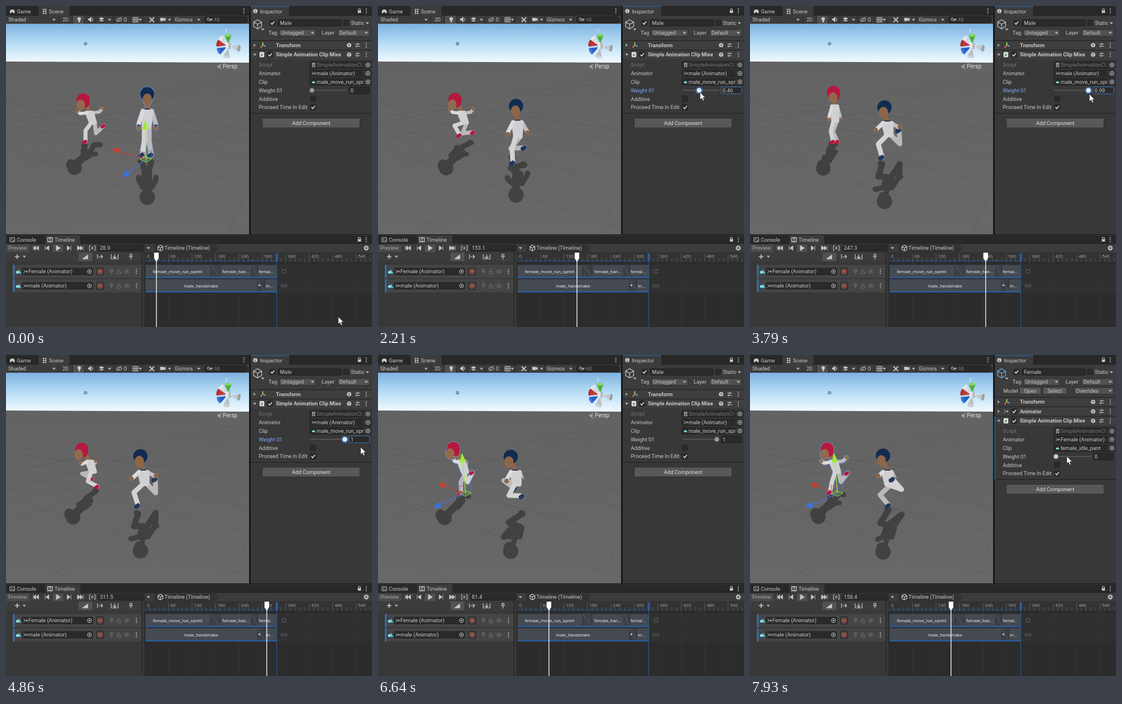
Animation of 640x561 px, one loop 8 s. Source, as an HTML page:

```html
<!DOCTYPE html>
<html lang="en">
<head>
<meta charset="utf-8">
<title>Animation clip mixer</title>
<style>
html, body { margin: 0; width: 100%; height: 100%; overflow: hidden; background: #282828; }
svg { display: block; width: 100vw; height: 100vh; }
text { font: 9.3px Roboto, sans-serif; white-space: pre; }
</style>
</head>
<body>
<svg id="stage" viewBox="0 0 640 561" preserveAspectRatio="none"></svg>
<script>
const LOOP = 8000, STEP = 1000 / 14, TAU = 2 * Math.PI;
const INK = '#c8c8c8', PANEL = '#3c3c3c', DARK = '#191919', FIELD = '#2a2a2a', BLUE = '#3a79bb';

// --- drawing helpers -------------------------------------------------
const rect = (x, y, w, h, fill, more = '') =>
  `<rect x="${x}" y="${y}" width="${w}" height="${h}" fill="${fill}" ${more}/>`;
const text = (x, y, s, { fill = INK, size = 9.3, bold, mid, more = '' } = {}) =>
  `<text x="${x}" y="${y + 3.4}" fill="${fill}" style="font-size:${size}px;font-weight:${bold ? 700 : 400}" ${mid ? 'text-anchor="middle"' : ''} ${more}>${s}</text>`;
const path = (d, stroke = INK, fill = 'none', width = 1, more = '') =>
  `<path d="${d}" stroke="${stroke}" fill="${fill}" stroke-width="${width}" ${more}/>`;
const dot = (x, y, r, fill = INK, more = '') => `<circle cx="${x}" cy="${y}" r="${r}" fill="${fill}" ${more}/>`;
const ring = (x, y, r, more = '') => dot(x, y, r, 'none', `stroke="${INK}" ${more}`);
const group = (s, more = '') => `<g ${more}>${s}</g>`;
const arrow = (x, y) => path(`M${x - 3} ${y - 1.5}h6l-3 3.5z`, 'none', '#b8b8b8');
const dots = (x, y) => [-3.5, 0, 3.5].map(d => dot(x, y + d, 0.9)).join('');
const lock = (x, y) => rect(x - 2.8, y - 0.5, 5.6, 4.2, INK) + path(`M${x - 1.8} ${y}v-2a1.8 1.8 0 0 1 3.6 0v2`, INK, 'none', 1.1);
const box = (x, y, w, h, fill = FIELD) => rect(x, y, w, h, fill, 'rx="2" stroke="#212121" stroke-width=".7"');
const check = (x, y, on) => box(x - 5, y - 5, 10, 10) + (on ? path(`M${x - 3} ${y}l2.2 2.5 4-5`, '#e0e0e0', 'none', 1.5) : '');
const target = (x, y) => ring(x, y, 3.5) + dot(x, y, 1.3);
const cube = (x, y, r, color) => path(`M${x} ${y - r}l${r * .87} ${r / 2}v${r}l${-r * .87} ${r / 2}l${-r * .87} ${-r / 2}v${-r}zM${x - r * .87} ${y - r / 2}l${r * .87} ${r / 2}l${r * .87} ${-r / 2}M${x} ${y}v${r}`, color, 'none', 1.2);
const fork = (x, y) => path(`M${x - 3.5} ${y - 3}l3 3h4M${x - 3.5} ${y + 3}l3 -3M${x + 1.5} ${y - 2}l2 2l-2 2`);
const clipMark = (x, y, s = 1) => path(`M${x - 3 * s} ${y + 3 * s}l${3.5 * s} ${-6 * s}l${3.5 * s} ${6 * s}z`, 'none', '#59d0d6') + dot(x - 2 * s, y + s, 1.8 * s, '#a6e8ea');
const button = (x, y, w, s) => box(x, y - 6, w, 12, '#585858') + text(x + w / 2, y, s, { mid: true });
const dropdown = (x, y, w, s) => box(x, y - 6, w, 12, '#515151') + text(x + 3, y, s) + arrow(x + w - 6, y);

// --- maths helpers ---------------------------------------------------
const mix = (a, b, k) => a.map((n, i) => n + (b[i] - n) * k);
const add = ([x, y], [dx, dy]) => [x + dx, y + dy];
const clamp = n => Math.min(1, Math.max(0, n));
const ease = k => k * k * (3 - 2 * k);

// --- scene view ------------------------------------------------------
function sceneBack() {
  let grid = '';
  for (let i = -3; i < 5; i++) grid += `M-450 98L${459 + i * 330} 399M520 98L${58 + i * 330} 399`;
  return '<clipPath id="view"><rect y="31" width="425" height="368"/></clipPath>' +
    rect(0, 31, 425, 368, 'url(#sky)') + path('M0 97L425 99V399H0z', 'none', 'url(#ground)') +
    path(grid, '#505050', 'none', 1, 'opacity=".4" clip-path="url(#view)"') +
    dot(139, 66, 2.6, '#8fa6bd', 'stroke="#5d7896"');
}

function sceneFront() {
  const cone = (angle, color, cap) => group(path('M4 0L19-6V6z', 'none', color) +
    `<ellipse cx="19" rx="2.500" ry="6" fill="${cap}"/>`, `transform="translate(389 70) rotate(${angle})"`);
  return text(383, 42, 'y', { fill: '#d8e8f0', size: 9 }) +
    cone(100, '#b9bec2', '#cfd3d6') + cone(225, '#d9dcde', '#e6e8ea') + cone(12, '#c4c8cb', '#9ba0a4') +
    cone(-92, '#4fae36', '#87d667') + cone(195, '#c23a3a', '#b02f2f') + cone(152, '#2a5fc0', '#3d78da') +
    rect(384, 64, 9, 11, '#e4e6e8') + rect(389, 64, 4, 11, '#b5b9bd') +
    path('M376 102l-6 4 6 4M376 106h-5', '#d6d6d6') + text(379, 106, 'Persp', { fill: '#e2e2e2', size: 10 });
}

function sceneBars() {
  return rect(0, 0, 426, 17, '#282828') + rect(57, 0, 54, 17, PANEL) + rect(0, 17, 425, 14, PANEL) +
    path('M7 8q-1 5 1 5l2-2h2l2 2q2 0 1-5-1-2-4-2t-4 2z', 'none', INK) + text(19, 9.5, 'Game') +
    path('M64 6h7M64 9.5h7M64 13h7M65.5 5v9M69.5 5v9') + text(75, 9.5, 'Scene') + dots(416, 8.5) +
    path('M92 17v14m24 0v-14m20 0v14m21 0v-14m31 0v14m29 0v-14m22 0v14m25 0v-14m27 0v14m52 0v-14', '#262626') +
    text(4, 23.5, 'Shaded') + text(99, 23.5, '2D', { size: 8.5 }) +
    rect(117, 17, 19, 14, '#505050') + dot(128, 22.5, 3) + rect(126.7, 25, 2.6, 3.5, INK) +
    path('M144 22h2l3-3v9l-3-3h-2zM151 21q2 2.5 0 5', INK, INK, .7) +
    path('M163 22l4-2 4 2-4 2zM163 25l4 2 4-2', INK, INK, .8) +
    path('M193 24q5-6 10 0-5 5-10 0zM194 28l8-9') + text(206, 23.5, '0') +
    path('M222 20h9v8h-9zM225 20v8M228 20v8M222 24h9') + path('M251 20l8 8M259 20l-8 8', INK, 'none', 1.8) +
    path('M270 21h6v5h-6zM276 23l3-2v5l-3-2z', INK, INK, .7) + text(295, 23.5, 'Gizmos') +
    rect(347, 18.5, 75, 11, '#292929', 'rx="4" stroke="#1c1c1c" stroke-width=".7"') +
    ring(354, 23, 2.2) + path('M356 25l2 2') + text(364, 23.5, 'All', { fill: '#808080', size: 8.5 }) +
    [84, 181, 235, 286, 337, 359].map(x => arrow(x, 24)).join('');
}

// --- inspector -------------------------------------------------------
function component(y, name, icon, on) {
  const open = name.startsWith('Simple');
  return rect(428, y - 8, 212, 16, '#3e3e3e') + rect(428, y - 8.5, 212, 1, '#1f1f1f') +
    (open ? arrow(435, y) : path(`M433 ${y - 3}l4 3-4 3z`, 'none', '#9a9a9a')) + icon +
    (on ? check(462, y, true) : '') + text(472, y, name, { bold: true, size: 9.2 }) +
    dot(600, y, 3.8) + text(600, y, '?', { fill: PANEL, size: 7, mid: true, bold: true }) +
    path(`M611 ${y - 2}h8M615 ${y - 4}v4M611 ${y + 2}h8M613 ${y}v4`) + dots(630, y);
}

function inspector(who, animator, clip, shift) {
  const female = shift > 0, own = id => female ? '' : `id="${id}"`;
  const row = i => 103 + shift + i * 14.8;
  const ref = (i, s, icon, fill) => box(531, row(i) - 6, 107, 12) + icon(538, row(i), .8) + text(543, row(i), s, { fill }) +
    rect(625, row(i) - 5, 12, 10, '#353535') + target(633, row(i));
  const axes = (x, y) => path(`M${x} ${y}v-5`, '#8fd04a', 'none', 2) + path(`M${x} ${y}l-4 4`, '#e66a4c', 'none', 2) + path(`M${x} ${y}l5 2`, '#4fa5e8', 'none', 2);
  const script = (x, y) => rect(x - 3, y - 4, 6, 8, '#8a8a8a') + text(x, y, '#', { size: 6, mid: true, fill: '#333' });
  const transformY = female ? 82 : 68.5, mixerY = 85 + shift, sliderY = row(3);

  let s = rect(428, 17, 212, female ? 57 : 44, PANEL) + cube(440, 32, 8, female ? '#63b5e8' : INK) + arrow(449, 41) +
    check(466, 29.5, true) + box(475, 23.5, 112, 12) + text(479, 29.5, who) + check(595, 29.5) + text(603, 29.5, 'Static') + arrow(632, 30) +
    text(459, 47, 'Tag') + dropdown(478, 47, 64, 'Untagged') + text(552, 47, 'Layer') + dropdown(580, 47, 56, 'Default');
  if (female) s += text(443, 62.5, 'Model') + button(471, 62.5, 38, 'Open') + button(512, 62.5, 42, 'Select') +
    dropdown(567, 62.5, 69, 'Overrides') + component(98.5, 'Animator', fork(448, 98.5), true);
  s += component(transformY, 'Transform', axes(449, transformY)) +
    component(mixerY, 'Simple Animation Clip Mixe', box(443, mixerY - 5, 9, 10, '#e8e8e8') +
      text(447.5, mixerY, '#', { fill: '#2d7a3e', size: 8, mid: true, bold: true }), true);
  s += ['Script', 'Animator', 'Clip', 'Weight 01', 'Additive', 'Proceed Time In Edit']
    .map((label, i) => text(442, row(i), label, { fill: i ? INK : '#777', more: i === 3 ? own('weightLabel') : '' })).join('');
  s += ref(0, 'SimpleAnimationCl', script, '#777') + ref(1, animator, fork) + ref(2, clip, clipMark) +
    rect(532, sliderY - .7, 64, 1.4, '#5e5e5e') +
    (female ? '' : dot(535, sliderY, 6.5, BLUE, 'id="halo" opacity=".75"')) +
    dot(535, sliderY, 3.9, female ? '#d0d0d0' : '#999', own('knob')) +
    rect(600, sliderY - 6, 36, 12, FIELD, `rx="2" stroke="#212121" ${own('weightBox')}`) +
    text(602.5, sliderY, '0', { more: own('weightText') }) +
    check(537, row(4)) + check(537, row(5), true) + rect(428, row(5) + 10, 212, 1, '#1f1f1f') +
    box(448, 196 + shift, 171, 17, '#585858') + text(533.5, 204.5 + shift, 'Add Component', { mid: true, fill: '#e0e0e0' });
  return s + (female ? rect(427.5, 107, 1.5, 111, '#1d6ba3') : '');
}

function inspectorPanel() {
  return rect(428, 0, 212, 399, '#383838') + rect(428, 0, 212, 17, '#282828') + rect(428, 0, 67, 17, PANEL) + rect(428, 0, 67, 1.5, '#2c5d87') +
    dot(436, 9, 3.8) + text(436, 9, 'i', { fill: PANEL, size: 7, mid: true, bold: true }) + text(444, 9.5, 'Inspector') +
    lock(618, 8.5) + dots(630, 8.5) +
    group(inspector('Male', 'male (Animator)', 'male_move_run_spri', 0), 'id="malePanel"') +
    group(inspector('Female', 'Female (Animator)', 'female_idle_pant', 30), 'id="femalePanel"');
}

// --- timeline --------------------------------------------------------
const timeX = v => 243.3 + 0.683 * v;

function track(y, name) {
  return rect(12, y - 11.5, 225, 23, '#454545') + rect(12, y - 11.5, 3, 23, '#2f6fb0') + clipMark(22, y, 1.2) +
    box(28, y - 6, 124, 12) + fork(34, y) + text(39, y, name) + target(146, y) +
    box(158, y - 6.5, 13, 13, '#3a3a3a') + dot(164.5, y, 4, 'none', 'stroke="#c9634f" stroke-width="1.2"') + dot(164.5, y, 2, '#d0664f') +
    path(`M182 ${y - 4}h5M183 ${y - 4}v4M186 ${y - 4}v4M181 ${y}h7M184.5 ${y}v4M194.5 ${y}h6v4h-6zM196 ${y}v-2a2 2 0 0 1 3 -1M206 ${y}q5.5-6 11 0-5.5 6-11 0z`, '#707070') +
    dot(211.5, y, 1.6, '#707070') + dots(228, y);
}

function clips(y, blends, names) {
  const top = y - 11.5, base = y + 9.3;
  const blend = ([a, b]) => rect(a, top, b - a, 20.8, '#3c4147') +
    path(`M${a} ${top}V${base}M${b} ${top}V${base}`, '#2b2f33') + path(`M${a} ${top}L${b} ${base}`, '#5a6066');
  return rect(244, top, 229, 21, '#444a50') + blends.map(blend).join('') + rect(244, base, 229, 2.2, '#2c62a8') +
    names.map(([x, n]) => text(x, y, n, { size: 8, mid: true, fill: '#e4e4e4' })).join('');
}

function timeline() {
  let s = rect(0, 400, 640, 161, '#383838') + rect(0, 401, 640, 15, '#282828') + rect(69, 401, 61, 15, PANEL) + rect(0, 416, 640, 15, PANEL) +
    path('M7 405h8v7h-8zM9 407l2 1.5-2 1.5M12 410h2') + text(19, 408.5, 'Console') +
    path('M73 405h8v7h-8zM77 405v7', INK, 'none', 1.3) + text(85, 408.5, 'Timeline') + lock(618, 408) + dots(630, 408.5) +
    rect(0, 417, 41, 13, '#4a4a4a') + text(4, 423, 'Preview', { fill: '#a8a8a8' }) + rect(82, 417, 18, 13, '#505050') +
    path('M48 419v8M52 419l-4 4 4 4zM57 419l-4 4 4 4zM68.5 419v8M75 419l-5 4 5 4zM88 418.5l7 4.5-7 4.5zM107 419l5 4-5 4zM113.5 419v8M125 419l5 4-5 4zM130 419l4 4-4 4zM135 419v8', INK, INK, .8) +
    path('M148 419h-2v8h2M154 419h2v8h-2M150 421l3 2-3 2z') +
    box(161, 417.5, 81, 11.5) + text(164, 423, '', { more: 'id="clock"' }) + arrow(249, 423) +
    path('M259 417H366l6 6-6 7H259z', 'none', '#323232') + cube(270, 423, 5, INK) + text(277, 423, 'Timeline (Timeline)') +
    ring(630, 423, 2.7, 'stroke-width="2"') + ring(630, 423, 4.2, 'stroke-dasharray="1.6 1.7"') +
    rect(0, 430, 237, 17, PANEL) + path('M15.5 438h8M19.5 434v8', INK, 'none', 1.7) + arrow(32, 438) +
    rect(127, 431, 24, 15, '#525252') + path('M134 442l9-7v7z', INK, INK) +
    path('M160 434v8M162 438h7M166 435l3 3-3 3M184 434v8h12v-8M190 434v6M187 438l3 3 3-3M216 434h5M217 434v4M220 434v4M215 438h7M218.5 438v5', INK, 'none', 1.2) +
    rect(237, 430, 403, 131, '#2c2c2c') + rect(243, 430, 397, 17, '#333') + rect(243, 444, 230, 3, '#273f5b');
  let ticks = '', majors = '';
  for (let v = 0; v < 580; v += 12) {
    ticks += `M${timeX(v)} ${v % 60 ? 441 : 433}V447`;
    if (v % 60) continue;
    majors += `M${timeX(v)} 447V561`;
    s += text(timeX(v) + 3.5, 437, v, { size: 8, fill: '#9d9d9d' });
  }
  s += path(ticks, '#666', 'none', .8) + rect(237, 452.5, 403, 23, '#303030') + rect(237, 477.5, 403, 23, '#303030') +
    path(majors, '#363636') + rect(237, 430, 6, 131, '#383838') + path('M237.5 430V561M243 430V561', '#232323') +
    track(464, 'Female (Animator)') + track(489, 'male (Animator)') +
    clips(464, [[358, 374], [430, 440]], [[300, 'female_move_run_sprint'], [402, 'female_han...'], [455, 'femal...']]) +
    clips(489, [[440, 452]], [[341, 'male_handshake'], [461, 'm...']]) + dot(443, 488, 1.5, '#ddd') +
    path('M490 464a3 3 0 0 1-3 3h-2a3 3 0 0 1 0-6h4M488 459.5l2 1.5-2 1.5M486 489q-5-5-5 0t5 0q5-5 5 0t-5 0', '#666') +
    rect(471.5, 432, 4, 14, '#2c5f9e') + path('M473.5 432V561', '#2b5896');
  return s + group(path('M0 446V561', '#fff', 'none', 1.3) + path('M-4 431h8v10l-4 6-4-6z', 'none', '#fff'), 'id="playhead"');
}

// --- characters ------------------------------------------------------
// torso: hip to neck, head: neck to head, hand: from the neck, foot: from the hip.
const WOMAN = {
  skin: '#93694c', hair: '#b5183f', shoe: '#b5183f', shoulder: 5, pelvis: 4, arm: 5.5, leg: 7, bone: 19, crown: 11.5,
  stand: { hip: [149, 201], torso: [-1, -28], head: [-2, -22], hand: [10, 25], foot: [4, 36] },
  run: { hip: [152, 204], torso: [-6, -20], head: [-13, -20], guard: 0, stride: 16, drop: 19, lift: 18 }
};
const MAN = {
  skin: '#8d6548', hair: '#112c50', shoe: '#23375d', shoulder: 8, pelvis: 5, arm: 7, leg: 8.5, bone: 24, crown: 12.5, cuffs: true,
  stand: { hip: [246, 212], torso: [1, -31], head: [0, -27], hand: [15, 32], foot: [8, 48] },
  run: { hip: [243, 226], torso: [-3, -24], head: [-7, -25], guard: 14, stride: 15, drop: 14, lift: 29 }
};

function standing({ hip, torso, head, hand: [hx, hy], foot: [fx, fy] }) {
  const neck = add(hip, torso);
  return { hip, neck, head: add(neck, head), handL: add(neck, [-hx, hy]), handR: add(neck, [hx, hy]),
    footL: add(hip, [-fx, fy]), footR: add(hip, [fx, fy]) };
}

function running({ hip, torso, head, guard, stride, drop, lift }, phase) {
  const c = Math.cos(TAU * phase), s = Math.sin(TAU * phase), neck = add(hip, torso);
  const foot = p => add(hip, [3 - stride * Math.cos(TAU * p), drop + lift * Math.sin(TAU * (p + .14))]);
  return { hip, neck, head: add(neck, add(head, [2 * c, s])), handL: add(neck, [-17 - 4 * c, guard + 5 * s]),
    handR: add(neck, [14 + 9 * c, guard - 5 * c]), footL: foot(phase), footR: foot(phase + .5) };
}

function pose(body, phase, runAmount, dip = 0) {
  const a = standing(body.stand), b = running(body.run, phase), p = {};
  for (const k in a) p[k] = add(mix(a[k], b[k], runAmount), [0, dip]);
  const knee = foot => {
    const dx = foot[0] - p.hip[0], dy = foot[1] - p.hip[1], d = Math.hypot(dx, dy);
    const bend = Math.sqrt(Math.max(0, body.bone ** 2 - d * d / 4));
    return add(mix(p.hip, foot, .5), [-dy / d * bend, dx / d * bend]);
  };
  const elbow = (hand, side) => add(mix(p.neck, hand, .6), [side * body.shoulder * .7, 4]);
  return { ...p, kneeL: knee(p.footL), kneeR: knee(p.footR), elbowL: elbow(p.handL, -1), elbowR: elbow(p.handR, 1) };
}

function figure(p, body, flat, grow = 0, flip = 1) {
  const side = (q, dx, dy = 0) => add(q, [dx, dy * flip]);
  const line = (pts, w, color) => path('M' + pts.join('L'), flat || color, 'none', w + grow, 'stroke-linecap="round" stroke-linejoin="round"');
  const oval = (c, rx, ry, color) => `<ellipse cx="${c[0]}" cy="${c[1]}" rx="${rx + grow / 2}" ry="${ry + grow / 2}" fill="${flat || color}"/>`;
  const arm = (k, dir, color) => line([side(p.neck, dir * body.shoulder, 3), p['elbow' + k], p['hand' + k]], body.arm, color) +
    (body.cuffs ? line([mix(p['elbow' + k], p['hand' + k], .7), p['hand' + k]], body.arm - .5, body.shoe) : '') +
    oval(p['hand' + k], body.arm * .55, body.arm * .55, body.skin);
  const leg = (k, dir, color) => line([side(p.hip, dir * (body.pelvis - 1)), p['knee' + k], p['foot' + k]], body.leg, color) +
    line([p['foot' + k], side(p['foot' + k], -3, 2)], body.leg - 1, body.shoe);
  const { shoulder: w, pelvis: h, crown: r } = body;
  const trunk = [side(p.neck, -w, 2), side(p.neck, w, 2), side(p.hip, h), side(p.hip, -h)];
  const face = side(p.head, (p.head[0] - p.neck[0]) * .4, 9);
  return leg('R', 1, '#b9b8ba') + arm('R', 1, '#bdbcbe') + line([p.neck, p.head], 7, body.skin) +
    path('M' + trunk.join('L') + 'z', flat || '#d0cfd1', flat || '#d0cfd1', 6 + grow, 'stroke-linejoin="round"') +
    (body.cuffs ? line([side(p.neck, -4, -1), side(p.neck, 4, -1)], 2, body.shoe) : oval(side(p.head, 4, 5), r * .6, r * .75, body.hair)) +
    leg('L', -1, '#d3d2d4') + arm('L', -1, '#dbdadc') +
    oval(p.head, r, r, body.hair) + oval(face, r * .66, r * .8, body.skin);
}

function shadow(p, body, [cx, ground], stretch, lean, skew) {
  const cast = {};
  for (const k in p) {
    const [x, y] = p[k], h = ground - y;
    cast[k] = [x - h * lean, ground + h * stretch - (x - cx) * skew];
  }
  return group(figure(cast, body, '#3d3d3d', 2, -.6), 'opacity=".88"');
}

const actor = (p, body, selected) => (selected ? figure(p, body, '#7396d0', 1.6) : '') + figure(p, body);

function gizmo([x, y], up, red, blue) {
  const arm = ([dx, dy], color, size) => {
    const n = Math.hypot(dx, dy), ux = dx / n, uy = dy / n, bx = x + dx - ux * size, by = y + dy - uy * size;
    return path(`M${x} ${y}L${bx} ${by}`, color, 'none', 1.2) +
      path(`M${x + dx} ${y + dy}L${bx - uy * 5} ${by + ux * 5} ${bx + uy * 5} ${by - ux * 5}z`, color, color, .8, 'stroke-linejoin="round"');
  };
  return path(`M${x} ${y}l-11-4v-10l11 3z`, '#c65b50') + path(`M${x} ${y}l10-6v-10l-10 5z`, '#5278c8') +
    path(`M${x - 11} ${y}l10-5 11 4-10 6z`, '#8ee04a', 'rgba(120,210,70,.3)') +
    arm(red, '#cf3d30', 11) + arm(blue, '#3d72dc', 14) + arm(up, '#a0ea3c', 15);
}

// --- motion ----------------------------------------------------------
const DRAG = 837, DRAG_END = 3820, PICK = 6500, SWAP = 7420, CLIP_END = 337;
const POINTER = [[0, 581, 543], [800, 536, 148], [DRAG_END, 594, 154], [4700, 614, 155], [5300, 650, 190],
  [6700, 650, 60], [7150, 618, 11], [SWAP, 618, 11], [7880, 554, 177]];

const clockAt = t => (28.9 + Math.max(0, t - 140) * .0599) % CLIP_END;
const weightAt = t => clamp((t - DRAG) / (DRAG_END - DRAG));

function pointerAt(t) {
  const next = POINTER.findIndex(key => key[0] > t);
  if (next < 0) return POINTER[POINTER.length - 1].slice(1);
  const [from, ...a] = POINTER[next - 1], [to, ...b] = POINTER[next], k = (t - from) / (to - from);
  return mix(a, b, from === 800 ? k : ease(k));
}

function womanPose(v) {
  const still = clamp((v - 168) / 23) - clamp((v - 274) / 14);
  return pose(WOMAN, (v - 28.9) / 32 + (v > 250 ? .47 : 0), 1 - still);
}

const manPose = (t, w) => pose(MAN, (t - 5930) / 538, w, 10 * Math.sin(Math.PI * w));

const $ = id => document.getElementById(id);
$('stage').innerHTML = `<defs>
  <linearGradient id="sky" x1="0" y1="31" x2="0" y2="98" gradientUnits="userSpaceOnUse">
    <stop offset="0" stop-color="#7db2e0"/><stop offset=".5" stop-color="#b6dcf5"/><stop offset="1" stop-color="#f0faff"/></linearGradient>
  <linearGradient id="ground" x1="0" y1="0" x2="0" y2="1"><stop offset="0" stop-color="#636363"/><stop offset="1" stop-color="#686868"/></linearGradient>
  </defs>` + rect(0, 0, 640, 561, DARK) + sceneBack() + '<g id="actors"></g>' + sceneFront() + sceneBars() + inspectorPanel() + timeline() +
  group(path('M0 0V13l3-2.7 2 4.7 2.2-1-2-4.5h4.1z', '#222', '#fff', .7), 'id="pointer"');

function draw(t) {
  const v = clockAt(t), w = weightAt(t), woman = womanPose(v), man = manPose(t, w);
  const manPicked = t < DRAG, womanPicked = t >= PICK, focused = !manPicked && !womanPicked;
  $('actors').innerHTML =
    shadow(woman, WOMAN, [145, 240], .5, .2, .5) + shadow(man, MAN, [240, 268], .58 + .2 * w, 0, .6 * w) +
    actor(woman, WOMAN, womanPicked) + actor(man, MAN, manPicked) +
    (manPicked ? gizmo([245, 268], [-2, -67], [-59, -18], [-42, 31]) : '') +
    (womanPicked ? gizmo([153, 242], [-6, -70], [-47, -17], [-57, 25]) : '');

  $('clock').textContent = v.toFixed(1);
  $('playhead').setAttribute('transform', `translate(${timeX(v)} 0)`);
  $('pointer').setAttribute('transform', `translate(${pointerAt(t)})`);
  $('malePanel').style.display = t < SWAP ? '' : 'none';
  $('femalePanel').style.display = t < SWAP ? 'none' : '';
  for (const id of ['knob', 'halo']) $(id).setAttribute('cx', 535 + 57.5 * w);
  $('halo').style.display = focused ? '' : 'none';
  $('knob').setAttribute('fill', focused ? '#eaf2fb' : '#999');
  $('weightText').textContent = +w.toFixed(2);
  $('weightBox').setAttribute('stroke', focused ? BLUE : '#212121');
  $('weightLabel').setAttribute('fill', focused ? '#7fa9f5' : INK);
}

function tick() {
  const t = performance.now() % LOOP;
  draw(Math.floor(t / STEP + .1) * STEP % LOOP);
  requestAnimationFrame(tick);
}
tick();
</script>
</body>
</html>
```
